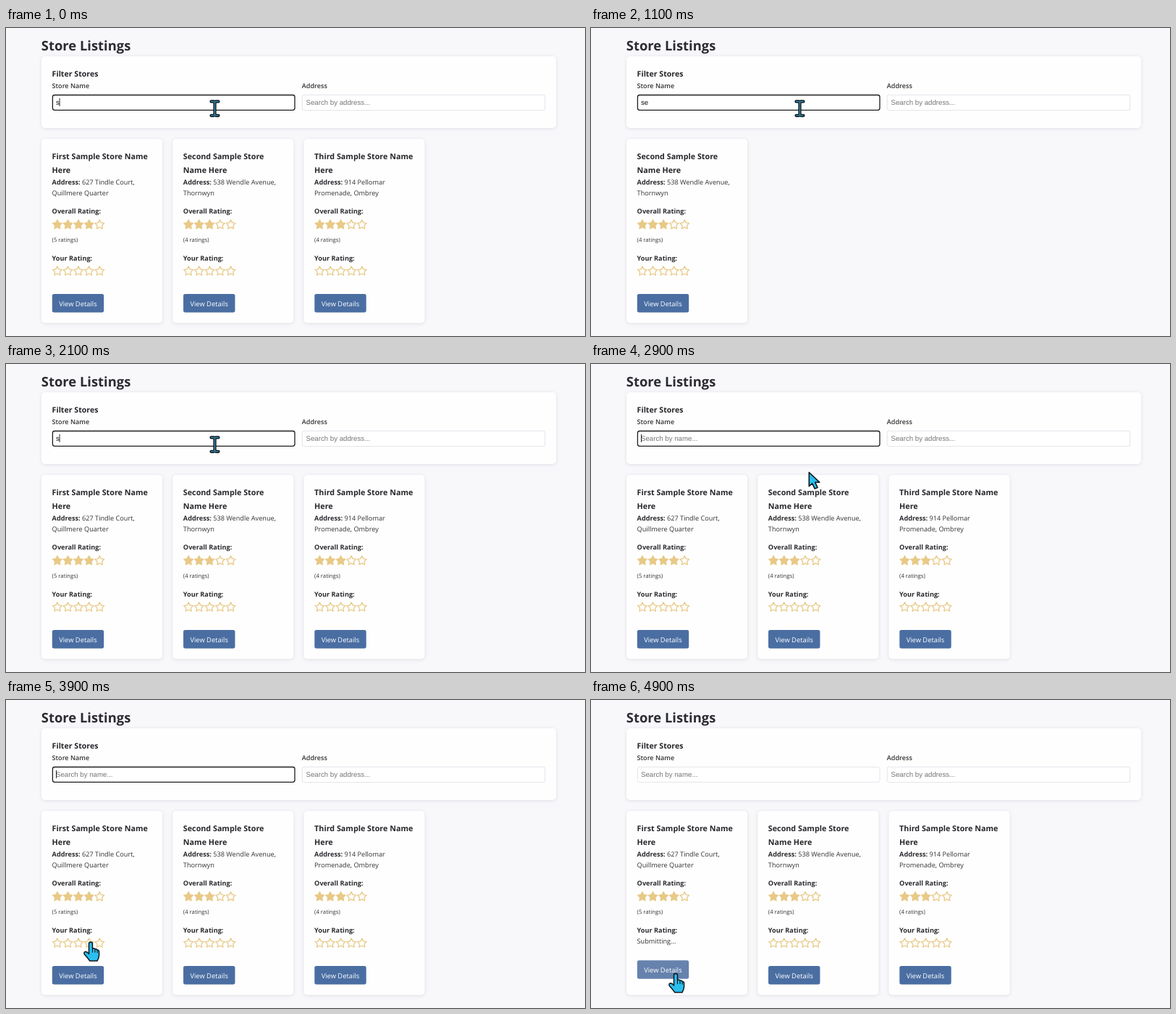
An HTML page for the animation above (5 s loop, 800 by 425 pixels).

```html
<!DOCTYPE html>
<html lang="en">
<head>
<meta charset="utf-8">
<title>Store Listings</title>
<style>
  html, body { margin: 0; width: 100%; height: 100%; overflow: hidden; background: #f8f8fb; }
  svg { display: block; width: 100%; height: 100%; }
  text { font: 9.17px "Open Sans", "Noto Sans", sans-serif; fill: #333; text-rendering: geometricPrecision; white-space: pre; }
  .title { font-size: 18.4px; font-weight: 700; fill: #2b2c31; }
  .head { font-size: 10.75px; font-weight: 700; fill: #26272b; }
  .label { font-size: 9.05px; font-weight: 600; }
  .bold { font-weight: 700; fill: #2b2c30; }
  .small { font-size: 7.75px; }
  .field { font: 9.68px "Liberation Sans", Arial, sans-serif; fill: #757575; }
  .btn { font-size: 9.35px; fill: #fff; text-anchor: middle; }
  .panel { fill: #fefefe; filter: drop-shadow(0 1.2px 2.6px rgba(30, 40, 70, .12)); }
  .star { stroke: #e8c987; stroke-width: 1.3; stroke-linejoin: round; }
  .pointer path { stroke: #10161c; stroke-linejoin: round; stroke-linecap: round; }
</style>
</head>
<body>
<svg id="stage" viewBox="0 0 800 425"></svg>
<script>
const LOOP = 5000, STEP = 100;
const BLUE = [74, 110, 162], HOVER = [102, 130, 173];
const stage = document.getElementById('stage');

function add(parent, tag, attrs = {}, content = '') {
  const el = document.createElementNS('http://www.w3.org/2000/svg', tag);
  for (const key in attrs) el.setAttribute(key, attrs[key]);
  el.textContent = content;
  parent.appendChild(el);
  return el;
}
const group = (parent, cls = '') => add(parent, 'g', { class: cls });
const label = (parent, x, y, cls, content) => add(parent, 'text', { x, y, class: cls }, content);
const box = (parent, x, y, width, height, rx, attrs) =>
  add(parent, 'rect', { x, y, width, height, rx, ...attrs });
const show = (el, on) => el.setAttribute('visibility', on ? 'visible' : 'hidden');
const move = (el, x, y) => el.setAttribute('transform', `translate(${x} ${y})`);

function starPath(cx, cy) {
  const points = Array.from({ length: 10 }, (_, i) => {
    const r = i % 2 ? 3.4 : 6.7, a = (i / 5 - 0.5) * Math.PI;
    return `${(cx + r * Math.cos(a)).toFixed(2)} ${(cy + r * Math.sin(a)).toFixed(2)}`;
  });
  return `M${points.join('L')}Z`;
}

function stars(parent, cy, filled) {
  const row = group(parent);
  for (let i = 0; i < 5; i++) {
    add(row, 'path', { d: starPath(21.9 + i * 14.6, cy), class: 'star', fill: i < filled ? '#e8c987' : 'none' });
  }
  return row;
}

// Card contents are relative to the card's left edge.
function makeCard(store) {
  const g = group(stage);
  box(g, 0, 153, 167, 254, 5, { class: 'panel' });
  store.name.forEach((line, i) => label(g, 14.6, 181 + i * 18.5, 'head', line));
  const address = label(g, 14.6, 215.7, '');
  add(address, 'tspan', { class: 'bold' }, 'Address:');
  add(address, 'tspan', {}, ' ' + store.address[0]);
  label(g, 14.6, 231.2, '', store.address[1]);
  label(g, 14.6, 256.4, 'bold', 'Overall Rating:');
  stars(g, 271.4, store.rating);
  label(g, 14.6, 295.2, 'small', `(${store.votes} ratings)`);
  label(g, 14.6, 320.5, 'bold', 'Your Rating:');
  const own = stars(g, 335.6, 0);
  const sending = label(g, 14.6, 336, '', 'Submitting...');
  const button = group(g);
  const face = box(button, 14.8, 367, 71.4, 25.4, 2.6);
  label(button, 50.4, 383.7, 'btn', 'View Details');
  return { g, own, sending, button, face };
}

label(stage, 48.8, 31, 'title', 'Store Listings');
box(stage, 49, 39, 711, 99, 5, { class: 'panel' });
label(stage, 63.6, 67, 'head', 'Filter Stores').style.fontSize = '10.6px';
label(stage, 63.6, 83, 'label', 'Store Name');
label(stage, 408.8, 83, 'label', 'Address');
const nameBox = box(stage, 64.4, 92.5, 334.6, 20.9, 2.8, { fill: '#fff' });
box(stage, 409.3, 92.4, 335.4, 21.2, 2, { fill: '#fff', stroke: '#dfe2e8', 'stroke-width': 0.9 });
const nameText = label(stage, 69, 106, 'field', '');
label(stage, 414.5, 106, 'field', 'Search by address...');
const caret = box(stage, 69, 97, 0.9, 11, 0, { fill: '#111' });

const cards = [
  { name: ['First Sample Store Name', 'Here'], address: ['627 Tindle Court,', 'Quillmere Quarter'], rating: 4, votes: 5 },
  { name: ['Second Sample Store', 'Name Here'], address: ['538 Wendle Avenue,', 'Thornwyn'], rating: 3, votes: 4 },
  { name: ['Third Sample Store Name', 'Here'], address: ['914 Pellomar', 'Promenade, Ombrey'], rating: 3, votes: 4 }
].map(makeCard);

// Pointers are drawn around their hot spot.
const beam = group(stage, 'pointer');
const beamPath = 'M-5 -9.6H-2Q0 -9.6 0 -7.6Q0 -9.6 2 -9.6H5M0 -7.6V8M-5 9.8H-2Q0 9.8 0 7.8Q0 9.8 2 9.8H5';
add(beam, 'path', { d: beamPath, fill: 'none', 'stroke-width': 4.2 });
add(beam, 'path', { d: beamPath, fill: 'none', 'stroke-width': 1.3, style: 'stroke:#3597bd' });
const arrow = group(stage, 'pointer');
add(arrow, 'path', { d: 'M0 0V19.2L4.4 15.3L7.9 22.6L11.7 20.9L8.4 13.8H14.6Z', fill: '#29bfee', 'stroke-width': 1.6 });
const hand = group(stage, 'pointer');
add(hand, 'path', {
  d: 'M-2.5 15V2.4Q-2.5 0 0 0Q2.5 0 2.5 2.4V9Q4.6 7.8 6 9.8Q8.2 8.8 9.2 11Q11.6 10.8 11.6 13.4V18Q11.6 21.6 9 26H-1.2Q-4 22 -8.6 17Q-10.2 13.8 -7 13.2Q-5 13.2 -2.5 16.4Z',
  fill: '#29bfee', 'stroke-width': 1.5
});
add(hand, 'path', { d: 'M2.5 9V14M6 9.8V14M9.2 11V14.6', fill: 'none', 'stroke-width': 1.1 });
const pointers = { beam, arrow, hand };

// Last key press: time, resulting text, caret position.
const keys = [[0, 's', 73.6], [400, 'se', 79], [1700, 's', 73.6], [2600, '', 69]];
// Pointer path: time, x, y.
const path = [
  [0, 288.5, 111], [2700, 288.5, 111], [2900, 301.3, 149.5], [3300, 117, 379],
  [3400, 117.5, 380], [3500, 119.2, 363.5], [3700, 117, 334], [4600, 117, 334],
  [4800, 117, 373], [4900, 117, 377.5], [5000, 117, 377.5]
];
const shapes = [[0, 'beam'], [2800, 'arrow'], [3300, 'hand'], [3500, 'arrow'], [3600, 'hand'],
  [4100, 'beam'], [4700, 'arrow'], [4800, 'hand']];
const hover = [[0, 0], [3300, 0.5], [3400, 1], [3500, 0.5], [3600, 0], [4800, 0.5], [4900, 1]];

const latest = (list, t) => list.filter(item => item[0] <= t).pop();

function pointerAt(t) {
  const i = path.findIndex(p => p[0] > t);
  const [t0, x0, y0] = path[i - 1], [t1, x1, y1] = path[i];
  const k = (t - t0) / (t1 - t0);
  return [x0 + (x1 - x0) * k, y0 + (y1 - y0) * k];
}

function draw(t) {
  const [pressed, typed, caretX] = latest(keys, t);
  const sent = t >= 4100, filtered = t >= 700 && t < 2000;

  nameBox.setAttribute('stroke', sent ? '#dfe2e8' : '#1c1e21');
  nameBox.setAttribute('stroke-width', sent ? 0.9 : 1.3);
  nameText.textContent = typed || 'Search by name...';
  nameText.style.fill = typed ? '#111' : '';
  caret.setAttribute('x', caretX);
  show(caret, !sent && (t - pressed) % 1000 < 500);

  const warm = latest(hover, t)[1];
  cards.forEach((card, i) => {
    const busy = sent && i === 0;
    const glow = i === 0 ? warm : 0;
    card.g.style.display = filtered && i !== 1 ? 'none' : '';
    move(card.g, 49 + (filtered ? 0 : i * 181.25), 0);
    card.own.style.display = busy ? 'none' : '';
    card.sending.style.display = busy ? '' : 'none';
    move(card.button, 0, busy ? -7.7 : 0);
    card.face.setAttribute('fill', `rgb(${BLUE.map((c, n) => Math.round(c + (HOVER[n] - c) * glow))})`);
  });

  const shape = latest(shapes, t)[1];
  for (const name in pointers) show(pointers[name], name === shape);
  move(pointers[shape], ...pointerAt(t));
}

function tick() {
  const t = performance.now() % LOOP;
  draw(Math.floor(t / STEP) * STEP);
  requestAnimationFrame(tick);
}
tick();
</script>
</body>
</html>
```
